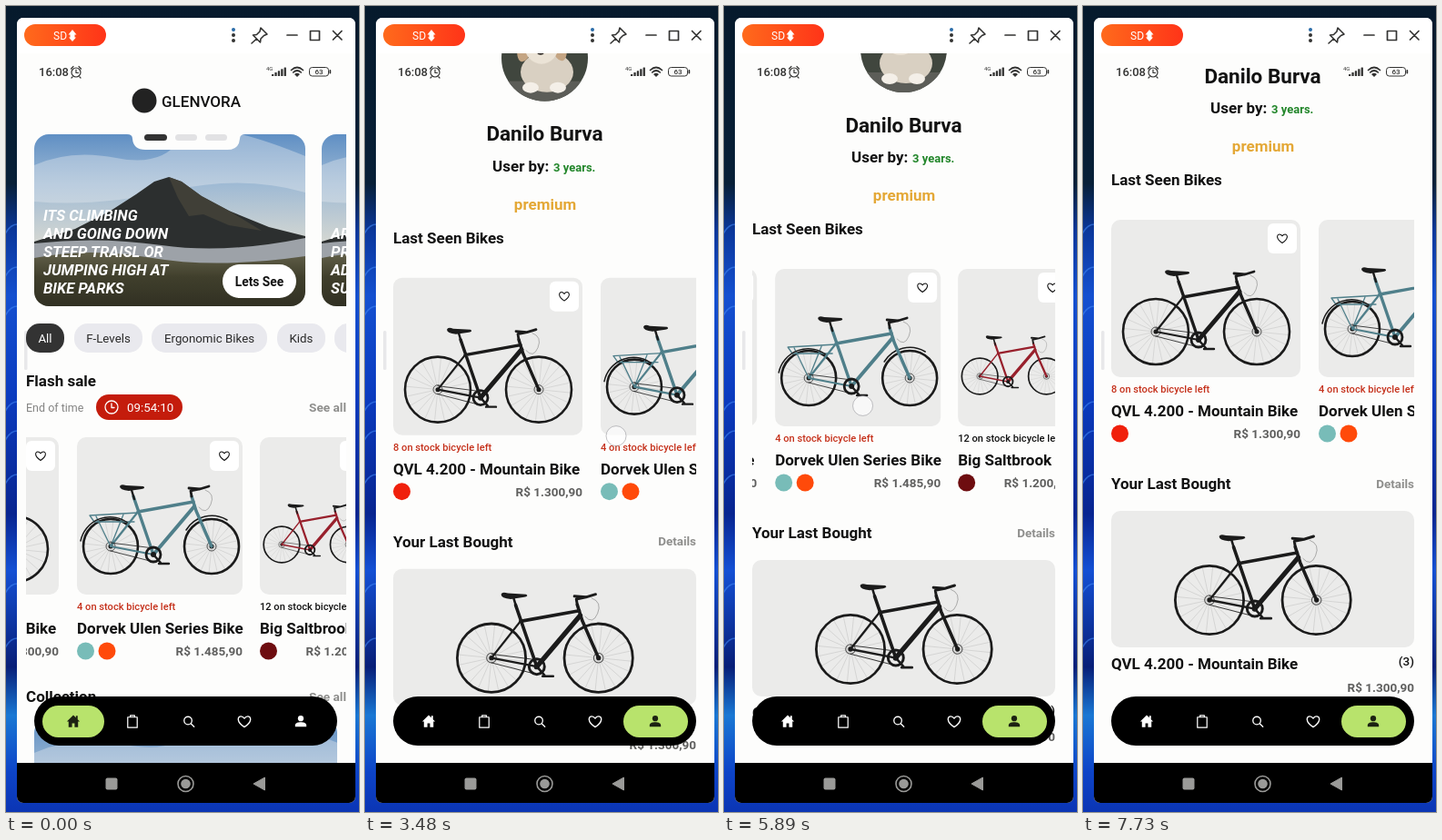
Write an HTML page that moves like this. It is 388 by 886 pixels and loops after 8 s.

```html
<!DOCTYPE html>
<html lang="en">
<head>
<meta charset="utf-8">
<title>Bike shop app</title>
<style>
html, body { margin: 0; height: 100%; overflow: hidden; background: #0a2a9c; }
svg { display: block; }
#stage { width: 100%; height: 100%; font-family: Roboto, sans-serif; }
text { white-space: pre; }
</style>
</head>
<body>
<svg id="stage" viewBox="0 0 388 886"></svg>
<script>
const PAPER = '#fdfdfc', CARD = '#ebebea', CHIP = '#e9e9ee', INK = '#121212';
const GREY = '#8e8e8c', PRICE = '#5f5f5e', CHROME = '#333332', SYSTEM = '#9a9a98', WHITE = '#fff';
const LOOP = 8000, SWITCH = 400;

// --- drawing helpers -------------------------------------------------
const rect = (x, y, w, h, r, fill, more = '') =>
  `<rect x="${x}" y="${y}" width="${w}" height="${h}" rx="${r}" fill="${fill}" ${more}/>`;
const circle = (x, y, r, fill, more = '') =>
  `<circle cx="${x}" cy="${y}" r="${r}" fill="${fill}" ${more}/>`;
const oval = (x, y, rx, ry, fill, turn = 0) =>
  `<ellipse cx="${x}" cy="${y}" rx="${rx}" ry="${ry}" fill="${fill}" transform="rotate(${turn} ${x} ${y})"/>`;
const line = (d, stroke, width = 1, more = '') =>
  `<path d="${d}" fill="none" stroke="${stroke}" stroke-width="${width}" stroke-linecap="round" stroke-linejoin="round" ${more}/>`;
const shape = (d, fill, more = '') => `<path d="${d}" fill="${fill}" ${more}/>`;
const text = (x, y, str, size, fill = INK, weight = 400, anchor = 'start', more = '') =>
  `<text x="${x}" y="${y}" font-size="${size}" fill="${fill}" font-weight="${weight}" text-anchor="${anchor}" ${more}>${str}</text>`;
const bold = (x, y, str, size = 17, fill = INK, anchor = 'start') => text(x, y, str, size, fill, 700, anchor);
const at = (x, y, body, scale = 1) => `<g transform="translate(${x} ${y}) scale(${scale})">${body}</g>`;
let clips = 0;
const clip = (x, y, w, h, r, body) => {
  const id = 'clip' + clips++;
  return `<clipPath id="${id}">${rect(x, y, w, h, r, '#000')}</clipPath><g clip-path="url(#${id})">${body}</g>`;
};
const gradient = (id, stops, dir = 'x2="0" y2="1"') =>
  `<linearGradient id="${id}" ${dir}>` +
  stops.map(([o, c]) => `<stop offset="${o}" stop-color="${c}"/>`).join('') + '</linearGradient>';

// --- icons, centred on 0,0 --------------------------------------------
const icons = {
  home: c => shape('M-7.500 0 0-7.500 3-4.500V-6.500H5V-2.500L7.500 0H5.500V6.500H1.500V2H-1.500V6.500H-5.500V0Z', c),
  bag: c => line('M-5.500-5H5.500V7H-5.500ZM-2.500-5V-7H2.500V-5', c, 1.3),
  search: c => line('M3.500-1A4.500 4.500 0 1 1-5.500-1 4.500 4.500 0 1 1 3.500-1M2.300 2.300 6 6', c, 1.4),
  heart: c => line('M0 6.500C-10 0-7.500-6-4-6-1.500-6 0-3.500 0-3.500S1.500-6 4-6C7.500-6 10 0 0 6.500Z', c, 1.4),
  user: c => circle(0, -3.5, 3.3, c) + shape('M-6.500 6V4.500C-6.500 1.500-3 .8 0 .8S6.500 1.500 6.500 4.500V6Z', c)
};

// --- pictures -----------------------------------------------------------
function bike(x, y, scale, r, color, rack) {
  const dark = '#1b1b1b';
  let spokes = '';
  for (let i = 0; i < 20; i++) {
    const a = i * Math.PI / 10 + 0.1;
    spokes += `M0 0L${(r * Math.cos(a)).toFixed(1)} ${(r * Math.sin(a)).toFixed(1)}`;
  }
  const wheel = cx => at(cx, 0,
    line(spokes, dark, 0.4, 'opacity=".25"') +
    circle(0, 0, r, 'none', `stroke="${dark}" stroke-width="2.600"`) +
    circle(0, 0, 5, 'none', `stroke="${dark}" stroke-width="1" opacity=".7"`) + circle(0, 0, 2.5, dark));
  const carrier = rack
    ? line('M-23-34 30-37M-23-34-18-27H26M-16-33 0 0M14-35 0 0', color, 1.3) +
      line(`M${-r - 3}-6A${r + 3} ${r + 3} 0 0 1 20-${r - 5}M${111 - r + 2}-18A${r + 3} ${r + 3} 0 0 1 128-${r - 1}`, dark, 1.5)
    : '';
  return at(x, y, wheel(0) + wheel(111) + carrier +
    line('M30-38 0 0 47 9', color, 2.2) +
    line('M25-55 47 9M30-38 91-49', color, 3.4) +
    line('M92-44 47 9', color, rack ? 4 : 5) +
    line('M89-55 94-39 111 0', color, 3.4) +
    line('M23-62 26-52', dark, 2.4) +
    shape('M10-66Q11-69 17-67L36-66Q39-64 34-63L20-61Q10-62 10-66Z', dark) +
    line('M89-55 88-61 98-63M86-64 98-63 108-66', dark, 2.8) +
    line('M104-62Q115-58 110-46T97-43', dark, 0.6, 'opacity=".5"') +
    circle(47, 9, 8, 'none', `stroke="${dark}" stroke-width="2.800"`) + circle(47, 9, 3, dark) +
    line('M0-4 47 2M0 5 47 17', dark, 0.8) +
    line('M47 9 55 18M53 19H64', dark, 2.4), scale);
}

// Mountain scene, 298 units wide, cropped to the given box.
const mountain = (x, y, w, h, r) => clip(x, y, w, h, r, at(x, y,
  rect(0, 0, 298, 220, 0, 'url(#sky)') +
  shape('M0 34Q40 16 90 26T160 6T298 24V64Q230 44 150 62T0 74Z', '#e4e9ee', 'opacity=".4"') +
  shape('M0 118 45 104 84 84 112 66 132 52 148 47 162 52 184 68 214 84 258 102 298 112V160H0Z', '#2c2f2f') +
  shape('M148 47 162 52 184 68 214 84 250 106 214 100 186 88 170 90 158 70Z', '#45443a', 'opacity=".8"') +
  shape('M0 120Q70 112 140 122T298 114V146H0Z', '#c3c8d0', 'opacity=".75"') +
  shape('M0 136Q60 124 130 136T298 134V220H0Z', 'url(#field)'), w / 298));

const avatar = clip(150, 99, 95, 95, 47.5,
  rect(150, 99, 95, 95, 0, '#40463e') + rect(150, 99, 95, 40, 0, '#252b27') + rect(150, 172, 95, 25, 0, '#5c5d58') +
  oval(200, 162, 29, 22, '#d9d0c2') +
  oval(176, 134, 8, 17, '#c4a583', 14) + oval(213, 133, 8, 17, '#c4a583', -14) +
  oval(194, 132, 19, 21, '#ebe3d6') +
  circle(187, 130, 2.2, '#2a2420') + circle(201, 130, 2.2, '#2a2420') + oval(193, 140, 4, 3, '#2a2420') +
  oval(182, 179, 9, 6, '#f4efe8') + oval(212, 179, 9, 6, '#f4efe8'));

// --- product cards --------------------------------------------------------
const MTB = 'QVL 4.200 - Mountain Bike', RED = '#c5301a';
const products = [
  { x: 0, w: 208, name: MTB, stock: 8, tint: RED, price: '1.300,90', dots: ['#f0200c'], bike: bike(49, 123, 1, 36, '#1b1b1b') },
  { x: 228, w: 182, name: 'Dorvek Ulen Series Bike', stock: 4, tint: RED, price: '1.485,90', dots: ['#78bcb8', '#ff4a0a'], bike: bike(37, 120, 1, 30, '#4f7f8a', true) },
  { x: 429, w: 124, name: 'Big Saltbrook', stock: 12, tint: INK, price: '1.200,90', dots: ['#6e0d10'], bike: bike(24, 118, 0.66, 30, '#98202c') }
];
const card = p => at(p.x, 0,
  '<g class="face">' + rect(0, 0, p.w, 173, 10, CARD) + p.bike +
  rect(p.w - 36, 4, 32, 33, 6, WHITE) + at(p.w - 20, 20.5, icons.heart(INK), 0.76) +
  text(0, 190, p.stock + ' on stock bicycle left', 11.1, p.tint, 500) + bold(0, 216, p.name) + '</g>' +
  p.dots.map((c, i) => circle(9.5 + i * 23.5, 235, 9.5, c)).join('') +
  bold(p.w, 240, 'R$ ' + p.price, 13.5, PRICE, 'end'));
const cards = products.map(card).join('');

// --- bottom navigation ------------------------------------------------------
const nav = (xs, active, px, pw) => rect(31, 759, 333, 54, 27, '#000') + rect(px, 769, pw, 35, 17.5, '#b8e36c') +
  Object.values(icons).map((icon, i) => at(xs[i], 786.5, icon(i === active ? '#1c2212' : WHITE), 0.95)).join('');

// --- home page ----------------------------------------------------------------
const chips = [[22, 42, 'All'], [75, 75, 'F-Levels'], [160, 127, 'Ergonomic Bikes'], [298, 53, 'Kids'], [361, 60, '']];
const slogan = (x, y, lines) => lines.map((s, i) =>
  text(x, y + 20 * i, s, 16.6, WHITE, 700, 'start', 'font-style="italic"')).join('');
const home = circle(152, 104, 13.5, '#222') + text(171, 110.5, 'GLENVORA', 17, INK, 500) +
  clip(22, 52, 352, 780, 0,
    mountain(31, 141, 298, 189, 16) + mountain(347, 141, 298, 189, 16) +
    shape('M133 141Q139 141 139 146Q140 158 153 158H243Q256 158 257 146Q257 141 263 141V138H133Z', PAPER) +
    rect(152, 141, 25, 7, 3.5, '#333') + rect(186, 141, 24, 7, 3.5, '#e2e2e4') + rect(219, 141, 24, 7, 3.5, '#e2e2e4') +
    slogan(41, 236, ['ITS CLIMBING', 'AND GOING DOWN', 'STEEP TRAISL OR', 'JUMPING HIGH AT', 'BIKE PARKS']) +
    slogan(357, 256, ['AROUND', 'PROUD', 'ADVANCE', 'SUMMIT']) +
    rect(238, 284, 81, 37, 18.5, WHITE) + bold(278.5, 308, 'Lets See', 13.8, INK, 'middle') +
    chips.map(([x, w, s], i) => rect(x, 349, w, 32, 15, i ? CHIP : '#333') +
      text(x + w / 2, 370, s, 13.3, i ? '#2a2a2a' : WHITE, 400, 'middle')).join('') +
    bold(22, 418, 'Flash sale') + text(22, 446, 'End of time', 12.5, '#858584') +
    rect(99, 427, 95, 28, 14, '#c41c0c') + line('M123 441A7 7 0 1 1 109 441 7 7 0 1 1 123 441M116 437V441.500H119', WHITE, 1.3) +
    text(133, 446, '09:54:10', 13.3, WHITE) + bold(374, 446, 'See all', 13.6, GREY, 'end') +
    at(-150, 474, cards) +
    bold(22, 765, 'Collection') + bold(374, 764, 'See all', 13.6, GREY, 'end') +
    mountain(31, 783, 333, 190, 16)) +
  nav([74, 139, 201, 262, 324], 0, 40, 68);

// --- profile page ---------------------------------------------------------------
const profile = '<g id="page">' + avatar +
  bold(197.5, 237.5, 'Danilo Burva', 22.5, INK, 'middle') +
  bold(140, 271, 'User by:') + bold(207, 271, '3 years.', 13, '#22862a') +
  bold(198, 313, 'premium', 17, '#e4a836', 'middle') +
  bold(31, 350, 'Last Seen Bikes') +
  clip(31, 380, 333, 260, 0, at(31, 388, `<g id="list">${cards}</g>`)) +
  bold(31, 684, 'Your Last Bought') + bold(364, 682.5, 'Details', 13.4, GREY, 'end') +
  rect(31, 708, 333, 150, 10, CARD) + bike(139, 806, 1.06, 35.5, '#1b1b1b') +
  bold(31, 882, MTB) + text(364, 878, '(3)', 13.5, INK, 500, 'end') +
  bold(364, 906.5, 'R$ 1.300,90', 13.5, PRICE, 'end') + '</g>' +
  nav([70, 131, 192, 253, 319], 4, 284, 71);

// --- desktop, window frame, status bar ---------------------------------------------
const desktop = rect(0, 0, 388, 886, 0, 'url(#desk)') +
  [245, 292, 335, 440, 472, 520, 640, 700].map(y =>
    line(`M-2 ${y + 8}Q4 ${y - 6} 14 ${y - 5}`, '#3f86f4', 1.5, 'opacity=".6"')).join('');

const titleBar = rect(12, 13, 372, 39, 0, WHITE) +
  rect(20, 20, 90, 24, 12, 'url(#badge)') + text(52, 36.5, 'SD', 12, WHITE) +
  shape('M73 26 77.500 31.500H75.500V34.500H77L73 39 69 34.500H70.500V31.500H68.500Z', WHITE) +
  circle(250, 26, 2, '#2a6ca8') + circle(250, 32, 2, CHROME) + circle(250, 38, 2, CHROME) +
  line('M280 24 287 31 283.500 32.500 280 36 279.500 40 271.500 32 275.500 31.500 279 28ZM275.500 36 270 41', CHROME, 1.6) +
  line('M309 32H320M334.500 27.500H344.500V37.500H334.500ZM359.500 27.500 369 37M369 27.500 359.500 37', CHROME, 1.7);

const status = text(36, 77, '16:08', 13, CHROME, 500) +
  line('M82 73A5 5 0 1 1 72 73 5 5 0 1 1 82 73M77 70V73.500H79.500M71.500 69 74 66.500M82.500 69 80 66.500M73 78 72 79M81 78 82 79', CHROME, 1.2) +
  text(286, 71, '4G', 6, CHROME) +
  [0, 1, 2, 3, 4].map(i => rect(292 + i * 3.4, 75 - i * 1.9, 2.3, 2 + i * 1.9, 0.5, CHROME)).join('') +
  line('M313.500 70.500Q320 64.500 326.500 70.500M315.700 73Q320 69 324.300 73', CHROME, 1.7) + shape('M320 78 317 75Q320 72.500 323 75Z', CHROME) +
  rect(333.5, 67.5, 21, 9.5, 3, 'none', `stroke="${CHROME}"`) + rect(355.5, 70, 1.7, 4.5, 0.8, CHROME) +
  text(344, 75.2, '63', 8, CHROME, 500, 'middle');

const systemBar = rect(12, 832, 372, 44, 0, '#000') + rect(109.5, 848.5, 13, 13, 2, SYSTEM) +
  circle(197.5, 855, 8.5, 'none', `stroke="${SYSTEM}" stroke-width="1.600"`) + circle(197.5, 855, 5.3, SYSTEM) +
  shape('M272 855 284.500 848V862Z', SYSTEM, `stroke="${SYSTEM}" stroke-linejoin="round"`);

const stage = document.getElementById('stage');
stage.innerHTML = '<defs>' +
  gradient('desk', [[0, '#061a2c'], [.22, '#082038'], [.28, '#0b389c'], [.36, '#1450d0'], [.48, '#0b3cc0'],
    [.63, '#082590'], [.70, '#1450d4'], [.82, '#081f78'], [.88, '#1a78d4'], [.95, '#0d44c8'], [1, '#0b35b4']]) +
  gradient('badge', [[0, '#ff6a1c'], [1, '#ff3418']], '') +
  gradient('sky', [[0, '#5f8fc4'], [.25, '#9fbad4'], [.55, '#d6d8d2']]) +
  gradient('field', [[0, '#62604a'], [.3, '#403f2c'], [1, '#22221a']]) + '</defs>' +
  desktop + clip(12, 13, 372, 863, 7,
    rect(12, 13, 372, 863, 0, PAPER) + titleBar + rect(20, 357, 3.5, 43, 1.5, '#e8e8ea') +
    clip(12, 52, 372, 780, 0, `<g id="home">${home}</g><g id="profile">${profile}</g>`) +
    status + systemBar +
    circle(0, 0, 11, WHITE, 'id="touch" fill-opacity=".65" stroke="#85858c" stroke-opacity=".5"'));

// --- motion -------------------------------------------------------------------------
const scrollKeys = [[2720, 0], [3480, 89], [3654, 153], [4250, 153], [4600, 99], [6480, 99], [7200, 148], [7470, 148], [7700, 153]];
const stretchKeys = [[3654, 0], [4060, 0.021], [4300, 0]];
const listKeys = [[4940, 0], [5110, 106], [5520, 219], [5860, 219], [6280, 0]];
const fadeKeys = [[4940, 1], [5030, 0.4], [5110, 0.5], [5280, 1]];
const touches = [
  [[230, 324, 787], [390, 324, 787]],
  [[2700, 270, 562], [3480, 276, 473], [4060, 296, 259], [4090, 296, 257]],
  [[4300, 296, 480], [4520, 294, 532]],
  [[4940, 282, 436], [5110, 176, 436], [5200, 128, 436]],
  [[5860, 130, 440], [6080, 290, 436]],
  [[6420, 283, 636], [6480, 283, 636], [7200, 290, 587], [7300, 290, 587]]
];

// Value of column `col` at time t, linear between keys and held outside them.
function sample(keys, t, col = 1) {
  const i = keys.findIndex(k => k[0] > t);
  if (i === 0) return keys[0][col];
  if (i < 0) return keys[keys.length - 1][col];
  const a = keys[i - 1], b = keys[i];
  return a[col] + (b[col] - a[col]) * (t - a[0]) / (b[0] - a[0]);
}

const el = id => document.getElementById(id);
const pressed = el('list').querySelectorAll('.face')[1];
const show = (id, on) => el(id).setAttribute('display', on ? 'inline' : 'none');

function draw(now) {
  const t = now % LOOP;
  show('home', t < SWITCH);
  show('profile', t >= SWITCH);
  el('page').setAttribute('transform',
    `translate(0 832) scale(1 ${1 + sample(stretchKeys, t)}) translate(0 ${-832 - sample(scrollKeys, t)})`);
  el('list').setAttribute('transform', `translate(${-sample(listKeys, t)} 0)`);
  pressed.setAttribute('opacity', sample(fadeKeys, t));
  const drag = touches.find(d => t >= d[0][0] && t < d[d.length - 1][0]);
  show('touch', drag);
  if (drag) el('touch').setAttribute('transform', `translate(${sample(drag, t, 1)} ${sample(drag, t, 2)})`);
}

const start = performance.now();
function tick() {
  draw(performance.now() - start);
  requestAnimationFrame(tick);
}
tick();
</script>
</body>
</html>
```
